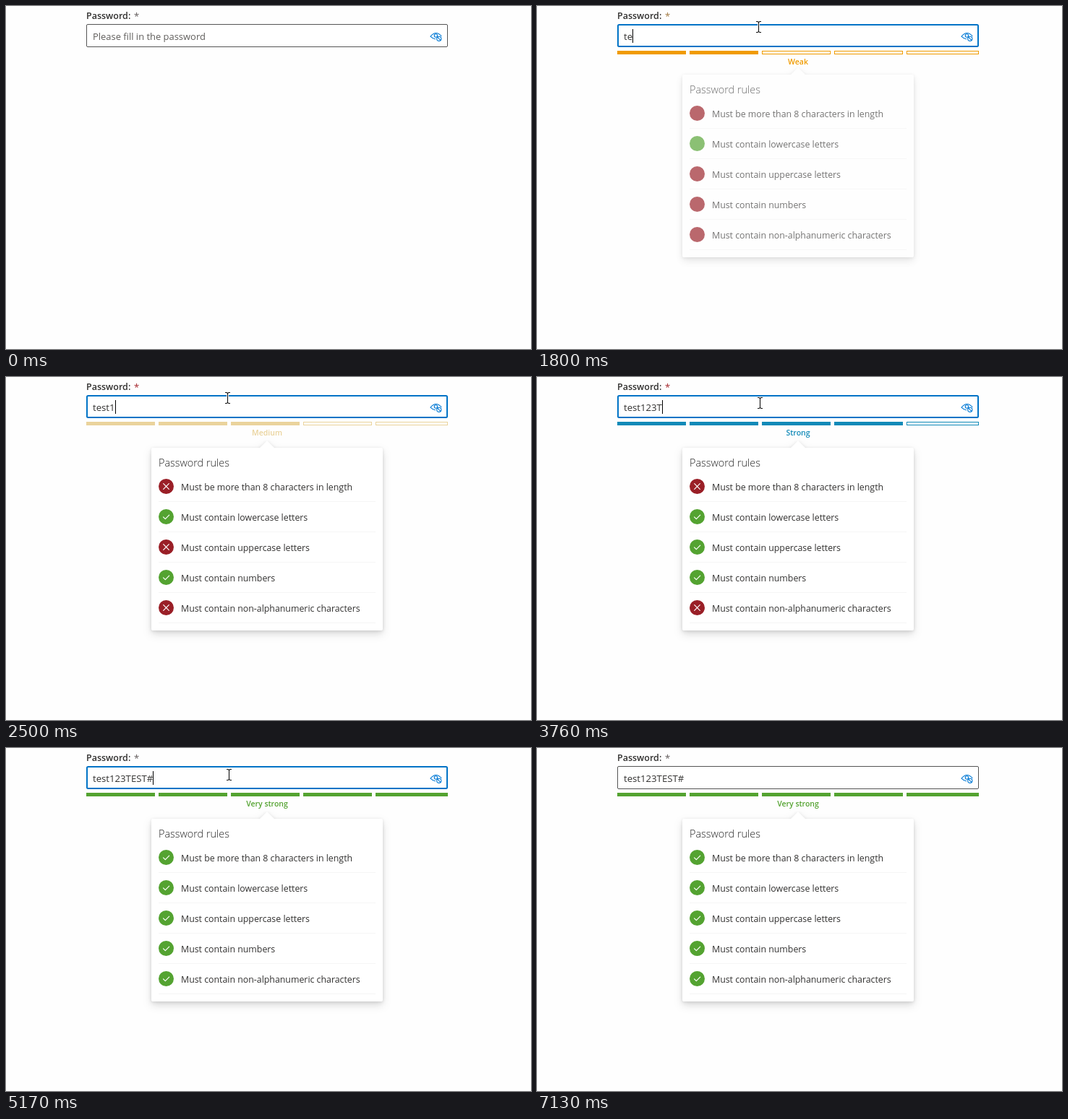
These frames come from a looping animation (726x475 px, 7200 ms). An HTML page:

```html
<!DOCTYPE html>
<html lang="en">
<head>
<meta charset="utf-8">
<title>Password rules</title>
<style>
  html, body { margin: 0; width: 100%; height: 100%; overflow: hidden; background: #fefefe; }
  svg { display: block; width: 726px; height: 475px; font-family: "Open Sans", "Noto Sans", sans-serif; }
  text { white-space: pre; }
  .label { font-size: 12.5px; font-weight: 600; fill: #323130; }
  .hint { font-size: 12.95px; fill: #605e5c; }
  .typed { font-size: 13.2px; fill: #323130; }
  .level { font-size: 10.5px; font-weight: 600; text-anchor: middle; }
  .title { font-size: 14.4px; font-weight: 300; fill: #222; }
  .rule { font-size: 12.35px; fill: #323130; }
  .eye, .mark { fill: none; stroke-linecap: round; stroke-linejoin: round; }
  .eye { stroke: #0078d4; stroke-width: 1.1; }
  .mark { stroke: #fff; stroke-width: 1.2; }
  #popup { filter: drop-shadow(0 5px 6px rgba(0,0,0,.13)) drop-shadow(0 1px 2px rgba(0,0,0,.12)); }
</style>
</head>
<body>
<svg viewBox="0 0 726 475">
  <text class="label" x="111" y="18">Password:</text>
  <text id="star" x="177" y="18.5" font-size="13">*</text>
  <rect id="box" fill="#fff"/>
  <text id="hint" class="hint" x="120" y="47">Please fill in the password</text>
  <text id="typed" class="typed" x="120" y="47"></text>
  <rect id="caret" y="32" width="1" height="19" fill="#000"/>
  <g class="eye">
    <path d="M587 42.2Q594.5 33 602 41.6M587 42.2Q590 45.4 593.6 45.7"/>
    <circle cx="594.4" cy="41" r="2.2"/>
    <circle cx="598.8" cy="45.3" r="3.1" fill="#fff"/>
    <path d="M596.7 43.2L600.9 47.4"/>
  </g>
  <g id="meter">
    <g id="bars"></g>
    <text id="level" class="level" x="361" y="81"></text>
  </g>
  <g id="card">
    <path id="popup" fill="#fff" d="M203 98H351L361 88L371 98H519Q521 98 521 100V349Q521 351 519 351H203Q201 351 201 349V100Q201 98 203 98Z"/>
    <text class="title" x="211" y="124">Password rules</text>
    <g id="rules"></g>
  </g>
  <g id="beam" fill="none">
    <path id="beamEdge" stroke="#fff" stroke-width="3" d="M-3 -7.5H-1L.5 -6.5L2 -7.5H4M.5 -6.5V6.5M-3 7.5H-1L.5 6.5L2 7.5H4"/>
    <path stroke="#111" stroke-width="1.1" d="M-3 -7.5H-1L.5 -6.5L2 -7.5H4M.5 -6.5V6.5M-3 7.5H-1L.5 6.5L2 7.5H4"/>
  </g>
  <path id="arrow" fill="#fff" stroke="#000" d="M.5 .5V16.5L4.2 13L6.6 18.5L9 17.4L6.6 12H11.6Z"/>
</svg>
<script>
const LOOP = 7200, WORD = 'test123TEST#';
const KEYS = [1730, 1800, 1940, 2150, 2500, 2710, 2990, 3690, 3830, 4050, 4260, 4820];
const FOCUS = 910, BLUR = 6490, BLINK = 545;
const GREEN = '#54a331', RED = '#9a1f27';
const LEVELS = [
  ['Very weak', RED], ['Weak', '#f09b00'], ['Medium', '#ead39c'],
  ['Strong', '#118ab8'], ['Very strong', GREEN]
];
const RULES = [
  ['Must be more than 8 characters in length', s => s.length > 8],
  ['Must contain lowercase letters', s => /[a-z]/.test(s)],
  ['Must contain uppercase letters', s => /[A-Z]/.test(s)],
  ['Must contain numbers', s => /\d/.test(s)],
  ['Must contain non-alphanumeric characters', s => /[^a-z\d]/i.test(s)]
];
// pointer stops: time, kind, x, y
const POINTER = [
  [0], [270, 'arrow', 330, 409], [340, 'arrow', 322, 250], [420, 'arrow', 313, 128],
  [490, 'arrow', 307, 72], [700, 'arrow', 306, 60], [770, 'beam', 306, 29],
  [3480, 'beam', 307, 33], [3550, 'beam', 308, 36], [4820, 'beam', 308, 37],
  [6070, 'arrow', 372, 92], [6140, 'arrow', 530, 210], [6210, 'arrow', 686, 318], [6280]
];

const $ = id => document.getElementById(id);
function add(parent, tag, attrs, text) {
  const el = document.createElementNS('http://www.w3.org/2000/svg', tag);
  set(el, attrs);
  if (text) el.textContent = text;
  return parent.appendChild(el);
}
function set(el, attrs) {
  for (const k in attrs) el.setAttribute(k, attrs[k]);
}
function show(el, on) {
  el.style.display = on ? '' : 'none';
}

const bars = LEVELS.map((_, i) => add($('bars'), 'rect', {
  x: 111.5 + i * 100, y: 62.5, width: i < 4 ? 94 : 99, height: 4
}));
const rules = RULES.map(([text, test], i) => {
  const g = add($('rules'), 'g', { transform: `translate(0 ${i * 42})` });
  const dot = add(g, 'circle', { cx: 221.5, cy: 151.5, r: 10.5 });
  const mark = add(g, 'path', { class: 'mark' });
  add(g, 'text', { class: 'rule', x: 242, y: 157 }, text);
  add(g, 'rect', { x: 211, y: 172, width: 300, height: 1, fill: '#f5f5f5' });
  return { dot, mark, test };
});

function drawField(t, s) {
  const focus = t >= FOCUS && t < BLUR;
  set($('box'), focus
    ? { x: 112, y: 26, width: 498, height: 30, rx: 1.5, stroke: '#0073c6', 'stroke-width': 2 }
    : { x: 111.5, y: 25.5, width: 499, height: 31, rx: 1.5, stroke: '#555', 'stroke-width': 1 });
  show($('hint'), !s);
  $('typed').textContent = s;
  const last = s ? KEYS[s.length - 1] : FOCUS;
  show($('caret'), focus && Math.floor((t - last) / BLINK) % 2 === 0);
  const width = s ? $('typed').getComputedTextLength() : 0;
  $('caret').setAttribute('x', Math.round(120 + width));
  const red = t >= KEYS[0] && t < KEYS[11];
  $('star').setAttribute('fill', !red ? '#605a5a' : t < 2010 ? '#a07840' : '#a4262c');
}

function drawRules(t, s) {
  show($('meter'), s);
  show($('card'), s);
  if (!s) return;
  let met = 0;
  for (const r of rules) {
    const ok = r.test(s);
    met += ok;
    r.dot.setAttribute('fill', ok ? GREEN : RED);
    r.mark.setAttribute('d', ok ? 'M217.5 151.8L220.3 154.6L225.7 149.2' : 'M217.7 147.7L225.3 155.3M225.3 147.7L217.7 155.3');
    show(r.mark, t >= 1870);
  }
  const score = Math.min(met, 4), [name, color] = LEVELS[score];
  bars.forEach((b, i) => set(b, { stroke: color, fill: i <= score ? color : '#fff' }));
  $('level').textContent = name;
  $('level').setAttribute('fill', color);
  // the card drops in on a 70 ms beat
  const step = Math.floor((t - KEYS[0]) / 70);
  const left = step > 3 ? 0 : Math.pow(.46, step);
  set($('card'), {
    transform: `translate(0 ${(-6.5 * left).toFixed(2)})`,
    opacity: 1 - .72 * left
  });
}

function drawPointer(t) {
  const [, kind, x, y] = POINTER.filter(p => p[0] <= t).pop();
  for (const id of ['arrow', 'beam']) {
    show($(id), id === kind);
    if (id === kind) $(id).setAttribute('transform', `translate(${x} ${y})`);
  }
}

function draw(t) {
  const s = WORD.slice(0, KEYS.filter(k => k <= t).length);
  drawField(t, s);
  drawRules(t, s);
  drawPointer(t);
}

const start = performance.now();
function tick() {
  draw((performance.now() - start) % LOOP);
  requestAnimationFrame(tick);
}
tick();
</script>
</body>
</html>
```
